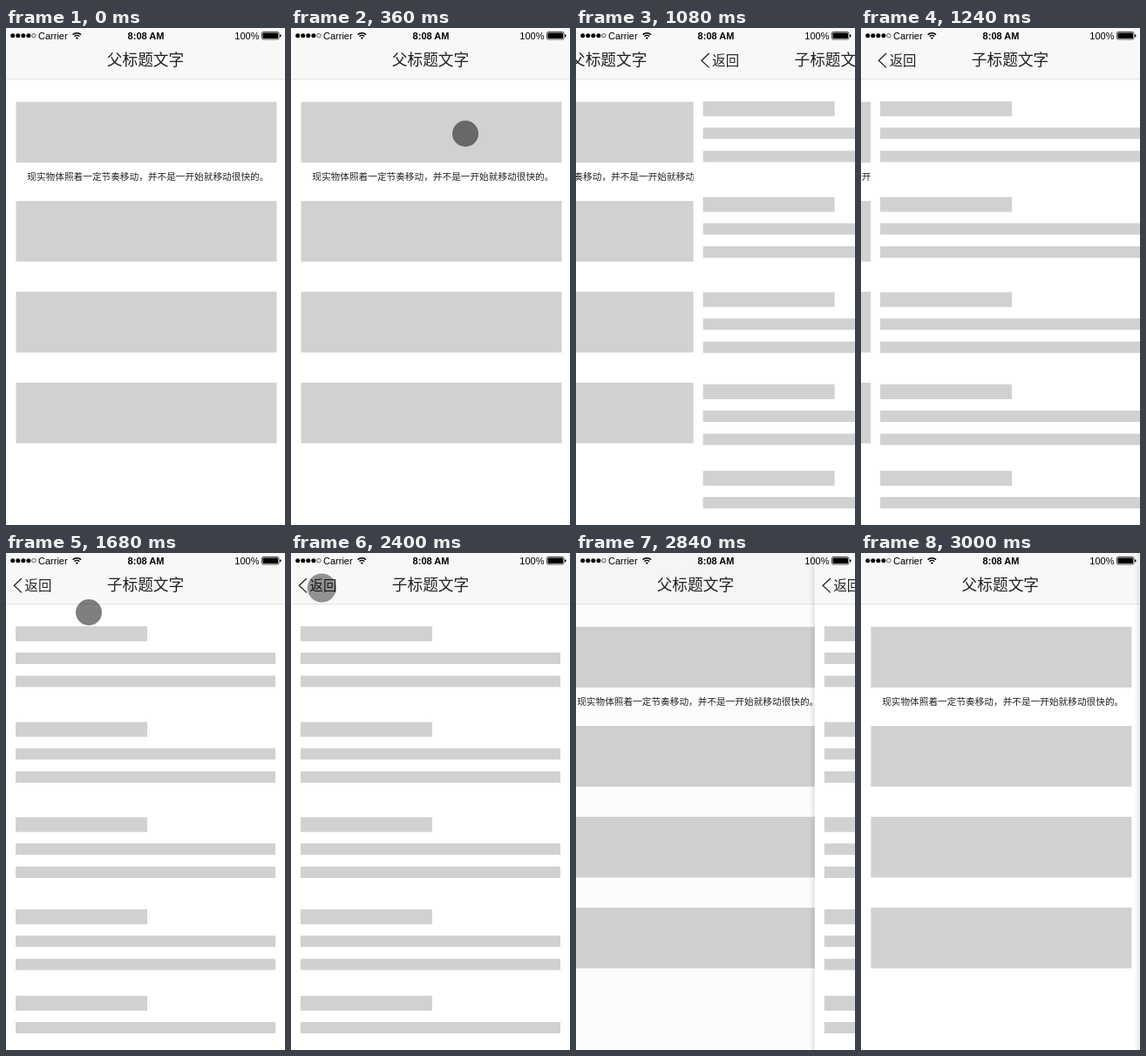
Write an HTML page that moves like this. It is 320 px wide and 569 px high and loops after 3480 ms.

```html
<!DOCTYPE html>
<html lang="zh">
<head>
<meta charset="utf-8">
<title>页面切换节奏</title>
<style>
html, body { margin: 0; height: 100%; overflow: hidden; background: #fff; }
svg { display: block; width: 100vw; height: 100vh; }
text { font-family: "Noto Sans CJK SC", "Noto Sans CJK", sans-serif; fill: #222; }
.title { font-size: 17.7px; font-weight: 300; text-anchor: middle; }
.back { font-size: 15.4px; font-weight: 300; }
.note { font-size: 10.67px; }
.status text { font: 11px "Liberation Sans", Arial, sans-serif; fill: #000; }
.block { fill: #d1d1d1; }
</style>
</head>
<body>
<svg viewBox="0 0 320 569">
  <defs>
    <linearGradient id="fade">
      <stop offset="0" stop-opacity="0"/>
      <stop offset="1" stop-opacity=".13"/>
    </linearGradient>
  </defs>
  <g id="parent"></g>
  <g id="child"></g>
  <g class="status">
    <g id="signal"></g>
    <text x="37" y="12.5">Carrier</text>
    <g fill="none" stroke="#000" stroke-width="1.5">
      <path d="M76.6 7.6a6.6 6.6 0 0 1 9.4 0M78.5 9.7a4 4 0 0 1 5.6 0"/>
    </g>
    <path d="M79.8 11.2a2.2 2.2 0 0 1 3 0L81.3 12.9z"/>
    <text x="160.5" y="12.5" text-anchor="middle" style="font-weight:bold">8:08 AM</text>
    <text x="290.5" y="12.5" text-anchor="end">100%</text>
    <rect x="293.5" y="4.5" width="19.5" height="8.5" rx="1.6" fill="none" stroke="#000" stroke-width=".7"/>
    <rect x="294.5" y="5.5" width="17.5" height="6.5" rx=".8"/>
    <path d="M314 7.2a1.6 1.6 0 0 1 0 3.2z"/>
  </g>
  <circle id="touch"/>
</svg>
<script>
const LOOP = 3480, STEP = 40, SLIDE = 417;
const $ = id => document.getElementById(id);
const clamp = v => Math.min(1, Math.max(0, v));
const mix = (a, b, p) => a + (b - a) * p;
const smooth = p => p * p * (3 - 2 * p);

// cubic-bezier(.4, 0, .2, 1), solved by bisection
function glide(x) {
  if (x <= 0 || x >= 1) return clamp(x);
  let lo = 0, hi = 1, s;
  for (let i = 0; i < 24; i++) {
    s = (lo + hi) / 2;
    const bx = 1.2 * s * (1 - s) ** 2 + .6 * s * s * (1 - s) + s ** 3;
    if (bx < x) lo = s; else hi = s;
  }
  return s * s * (3 - 2 * s);
}

const block = (x, y, w, h) => `<rect class="block" x="${x}" y="${y}" width="${w}" height="${h}"/>`;
const page = title => `
  <rect width="320" height="569" fill="#fff"/>
  <rect width="320" height="58" fill="#f8f8f8"/>
  <rect y="58" width="320" height=".7" fill="#d8d8d8"/>
  <text class="title" x="160" y="43">${title}</text>`;

$('parent').innerHTML = page('父标题文字') +
  [84.5, 198, 302, 406].map(y => block(11.5, y, 299, 69.5)).join('') +
  '<text class="note" x="24.3" y="174.2">现实物体照着一定节奏移动，并不是一开始就移动很快的。</text>' +
  '<rect id="dim" width="320" height="569"/>';

$('child').innerHTML = '<rect id="shadow" x="-6" width="6" height="569" fill="url(#fade)"/>' +
  page('子标题文字') +
  '<path d="M18 29L9.3 37.2L18 45.4" fill="none" stroke="#222" stroke-width="1.3"/>' +
  '<text class="back" x="21.6" y="42.6">返回</text>' +
  [84, 193.5, 302.5, 408, 507].map((y, i) =>
    block(11, y, 151, 17) + block(11, y + 30, 298, 13) +
    (i < 4 ? block(11, y + 56.5, 298, 13) : '')).join('');

$('signal').innerHTML = [0, 1, 2, 3, 4].map(i =>
  `<circle cx="${7.7 + i * 6.05}" cy="8.7" r="${i < 4 ? 2.5 : 2.25}"` +
  (i < 4 ? '/>' : ' fill="none" stroke="#000" stroke-width=".6"/>')).join('');

// start: move begins, tap: dot swells and fades
const taps = [
  { start: 0, tap: 680, from: [367, 148], to: [200, 121] },
  { start: 1680, tap: 2360, from: [95, 68], to: [35.3, 40] }
];

function drawTouch(t) {
  const tap = taps.find(k => t >= k.start && t < k.tap + 240);
  const dot = $('touch');
  dot.setAttribute('visibility', tap ? 'visible' : 'hidden');
  if (!tap) return;
  const move = smooth(clamp((t - tap.start) / 360));
  const fade = clamp((t - tap.tap) / 240);
  dot.setAttribute('cx', mix(tap.from[0], tap.to[0], move));
  dot.setAttribute('cy', mix(tap.from[1], tap.to[1], move));
  dot.setAttribute('r', 15 + 9 * fade);
  dot.setAttribute('opacity', .5 * (1 - fade));
}

function draw(t) {
  const popping = t >= 2600;
  const p = glide((t - (popping ? 2600 : 920)) / SLIDE);
  const shift = (id, x) => $(id).setAttribute('transform', `translate(${x})`);
  shift('child', popping ? 320 * p : 320 * (1 - p));
  shift('parent', popping ? -160 * (1 - p) : -212 * p);
  $('dim').setAttribute('opacity', popping ? .082 * (1 - p) : 0);
  $('shadow').setAttribute('opacity', popping && p < 1 ? 1 - p * .3 : 0);
  drawTouch(t);
}

function tick() {
  const t = performance.now() % LOOP;
  draw(Math.floor(t / STEP) * STEP);
  requestAnimationFrame(tick);
}
tick();
</script>
</body>
</html>
```
